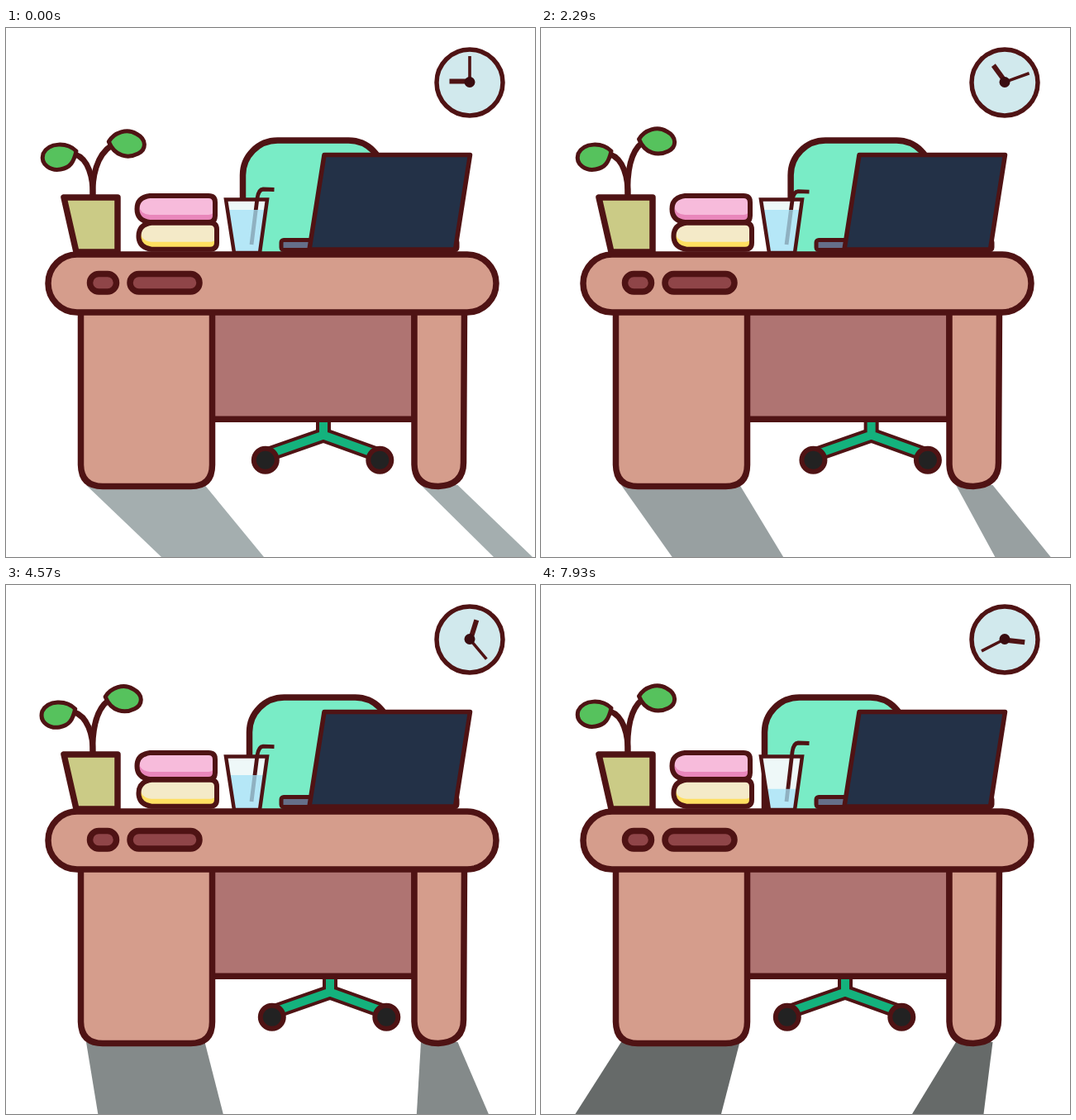
An HTML page that plays this animation: 640x640 px, repeating every 8000 ms.

```html
<!DOCTYPE html>
<html lang="en">
<head>
<meta charset="utf-8">
<title>Desk</title>
<style>
  html, body { margin: 0; width: 100%; height: 100%; overflow: hidden; background: #fff; }
  svg { display: block; width: 100%; height: 100%; }
  .line { stroke: #4f1314; stroke-linejoin: round; }
  .sharp { stroke-linejoin: miter; }
  .open { fill: none; }
  .pink { --light: #f7bbdb; --shade: #e987bb; }
  .yellow { --light: #f4eac8; --shade: #ffdf61; }
</style>
</head>
<body>
<svg viewBox="0 0 640 640">
  <defs>
    <path id="cover" d="M174 203H245Q253 203 253 211V227Q253 235 245 235H174Q158.500 233 158.500 219Q158.500 205 174 203Z"/>
    <g id="book">
      <use href="#cover" fill="var(--shade)"/>
      <path d="M174 203H245Q252 203 252 211V219Q252 226 245 226H174Q162 225 161 215Q163 205 174 203Z" fill="var(--light)"/>
      <use href="#cover" class="line open" stroke-width="6"/>
    </g>
    <path id="chairLegs" d="M384 465V492.500M314 517L384 492.500L452 517"/>
    <path id="cup" d="M266 207.500H316L307 272H276Z"/>
  </defs>

  <g id="shadow"><polygon id="shadowLeft"/><polygon id="shadowRight"/></g>

  <g class="line">
    <circle cx="561" cy="66" r="40" fill="#d1e9ed" stroke-width="5.5"/>
    <path id="hour" d="M561 64.500H536.500" stroke-width="6"/>
    <path id="minute" d="M561 66V34" stroke-width="3.600"/>
    <circle cx="561" cy="65.500" r="6.500" fill="#3a0c10" stroke="none"/>
  </g>

  <g id="chair">
    <rect class="line" x="286.500" y="136" width="170" height="180" rx="42" fill="#79ecc6" stroke-width="7.500"/>
    <use href="#chairLegs" class="line open sharp" stroke-width="18"/>
    <use href="#chairLegs" class="open" stroke="#14b27d" stroke-width="10"/>
    <g class="line" fill="#222" stroke-width="6">
      <circle cx="313.800" cy="522.700" r="14"/><circle cx="452.300" cy="522.700" r="14"/>
    </g>
  </g>

  <g class="line">
    <path id="stemLeft" class="open" stroke-width="7"/>
    <path id="stemRight" class="open" stroke-width="7"/>
    <g fill="#56c25d" stroke-width="5">
      <path id="leafLeft" d="M85 149C74 138 52 138 45 152C41 166 55 173 66 171C78 169 82 162 85 149Z"/>
      <path id="leafRight" d="M118.500 134.500C125 123 141 118 152 125C165 132 164 144 154 149C142 155 126 153 118.500 134.500Z"/>
    </g>
    <path d="M70 205H135V271H85Z" fill="#cbcb86" stroke-width="7.500"/>
  </g>

  <use href="#book" class="yellow" x="2" y="32.700"/>
  <use href="#book" class="pink" id="topBook"/>

  <use href="#cup" fill="#eef8f8"/>
  <path id="straw" class="line open" stroke-width="4.800"/>
  <polygon id="water" fill="rgb(163,226,248)" fill-opacity=".76"/>
  <use href="#cup" class="line open sharp" stroke-width="4.500"/>

  <g class="line">
    <rect x="333" y="256.500" width="213" height="12" rx="3" fill="#656f89" stroke-width="5"/>
    <polygon id="lid" fill="#233147" stroke-width="5.500"/>
  </g>

  <g class="line" stroke-width="7.500" fill="#d59d8c">
    <rect x="249" y="340" width="245" height="133.300" fill="#af7472"/>
    <path d="M90.500 340V528.500Q91 554.500 117 554.500H223.500Q249.500 554.500 249.500 528.500V340Z"/>
    <path d="M494 340V528Q495 554.500 523 554.500Q553.500 553 553.500 526L554.500 340Z"/>
    <rect x="51" y="274" width="542" height="70" rx="35"/>
    <g fill="#8f4548">
      <rect x="101.500" y="297.500" width="32" height="21.500" rx="10.700"/>
      <rect x="150" y="297.500" width="84" height="21.500" rx="10.700"/>
    </g>
  </g>
</svg>
<script>
const LOOP = 8000;
const set = (id, name, value) => document.getElementById(id).setAttribute(name, value);
const shift = (id, x, y = 0) => set(id, 'transform', `translate(${x} ${y})`);
const turn = (id, angle) => set(id, 'transform', `rotate(${angle} 561 65.5)`);
const clamp = (x, low, high) => Math.min(high, Math.max(low, x));
const mix = (a, b, p) => a + (b - a) * p;

// Eased step from 0 to 1, and a soft bump that rises to 1 at its middle.
const slide = (t, from, to) => (1 - Math.cos(Math.PI * clamp((t - from) / (to - from), 0, 1))) / 2;
const bump = (t, middle, half) => (1 + Math.cos(Math.PI * clamp((t - middle) / half, -1, 1))) / 2;

function drawShadow(t) {
  const p = Math.max(0, (t - 880) / 7050);
  const curved = p * (1.55 - .55 * p);
  set('shadow', 'fill', `rgb(${mix(164, 102, p)},${mix(174, 106, p)},${mix(175, 105, p)})`);
  set('shadowLeft', 'points', `97,553 240.5,553 ${mix(312, 218, p)},640 ${mix(188, 41.5, p)},640`);
  set('shadowRight', 'points', `502,553 546.5,553 ${mix(637, 535.5, p)},640 ${mix(590, 449, curved)},640`);
}

function drawPlant(t) {
  const nod = time => 5.5 * bump(time, 1700, 500) - 3 * bump(time, 950, 500);
  const lx = nod(t) + nod(t - 3900), ly = -.75 * lx;
  const rx = 10.5 * bump(t, 750, 1600) + 19 * bump(t, 5300, 900);
  const ry = .45 * rx + .0135 * rx * rx;
  shift('leafLeft', lx, ly);
  shift('leafRight', rx, ry);
  set('stemLeft', 'd', `M105 205C106 180 ${99 + lx} ${158 + ly} ${84 + lx} ${153 + ly}`);
  set('stemRight', 'd', `M105 205C104 180 ${107 + rx * .4} ${151 + ry} ${122 + rx} ${139 + ry}`);
}

function drawGlass(t) {
  const level = 220 + Math.max(0, t - 2570) * .005;
  const inset = (level - 207.5) / 64.5;
  const y = 195 + 3.5 * bump(t, 2900, 1900) - 4 * slide(t, 4400, 6200);
  set('water', 'points', `${266 + 10 * inset},${level} ${316 - 9 * inset},${level} 307,272 276,272`);
  set('straw', 'd', `M297 262L304 ${y + 11}Q305.5 ${y + .5} 311 ${y}L324.5 ${y + .5}`);
}

function drawLaptop(t) {
  const top = 153.5 + 5 * bump(t, 1570, 500) + 2 * bump(t, 5500, 500);
  set('lid', 'points', `385,${top} 561.5,${top} 543.5,268 367,268`);
}

function draw(t) {
  drawShadow(t);
  drawPlant(t);
  drawGlass(t);
  drawLaptop(t);
  turn('minute', t * .0306);
  turn('hour', t * .0235);
  shift('chair', 20.5 * slide(t, 0, 1570) - 12.5 * slide(t, 1570, 3250) - 24 * slide(t, 4800, 6550));
  shift('topBook', 9.5 * bump(t, 6430, 500));
}

const start = performance.now();
function frame() {
  draw((performance.now() - start) % LOOP);
  requestAnimationFrame(frame);
}
frame();
</script>
</body>
</html>
```
